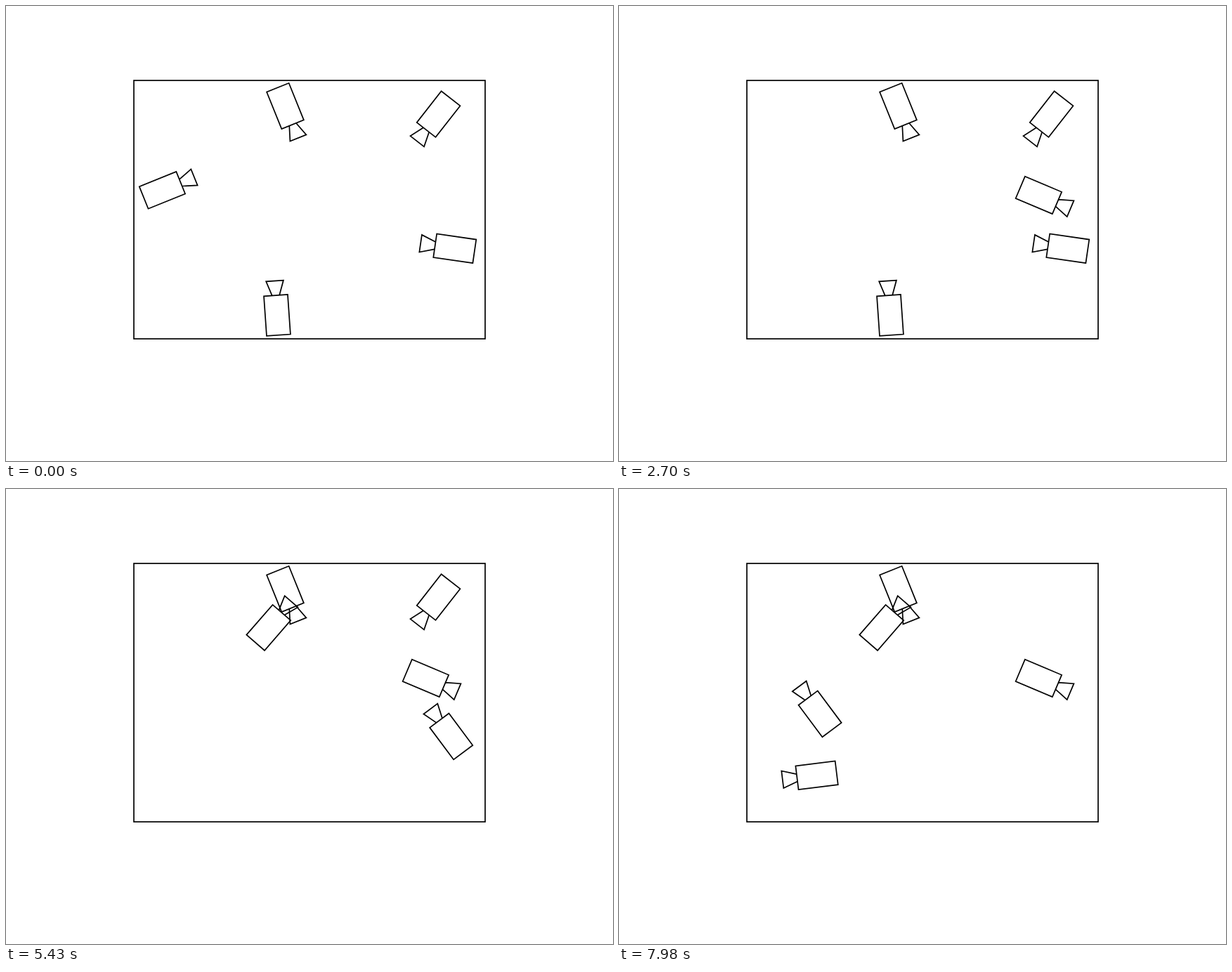
Animation, 864 px wide and 648 px high, one loop 8 s. Source, as an HTML page:

```html
<!DOCTYPE html>
<html lang="en">
<head>
<meta charset="utf-8">
<title>Turning cameras</title>
<style>
html, body { margin: 0; width: 100%; height: 100%; overflow: hidden; background: #fff; }
svg { display: block; width: 100vw; height: 100vh; }
</style>
</head>
<body>
<svg id="stage" viewBox="0 0 864 648" fill="none" stroke="#000" stroke-width="1.7" stroke-miterlimit="10">
  <rect x="182" y="106" width="500" height="368"/>
</svg>
<script>
const LOOP = 8000, STEP = 30, PHASE = 900, TURN = 45;

// Body and lens hood, facing right, around the point the camera turns on
const SHAPE = 'M-39.35-17h56.7v34h-56.7zM17.35-5.2L38.15-12.4V12.4L17.35 5.2';

// Each camera turns, then slides by (dx, dy), one after the other
const cameras = [
  { x: 232.6, y: 258.2, angle: -22, dx: 374.9, dy: 15.5 },
  { x: 385.2, y: 429.5, angle: 266, dx: -4.2, dy: -240.4 },
  { x: 627.9, y: 343.7, angle: 188.3, dx: -348.4, dy: -32.2 },
  { x: 608.8, y: 162.7, angle: 128, dx: -350.6, dy: 255.5 },
  { x: 401.6, y: 152.6, angle: 68 }
];

const stage = document.getElementById('stage');
for (const cam of cameras) {
  cam.node = document.createElementNS(stage.namespaceURI, 'path');
  cam.node.setAttribute('d', SHAPE);
  stage.append(cam.node);
}

// Cubic Bezier (.42, 0, .58, 1), solved for its parameter by bisection
function ease(p) {
  if (p <= 0) return 0;
  if (p >= 1) return 1;
  let lo = 0, hi = 1;
  for (let i = 0; i < 24; i++) {
    const s = (lo + hi) / 2, r = 1 - s;
    const x = 1.26 * s * r * r + 1.74 * s * s * r + s * s * s;
    if (x < p) lo = s; else hi = s;
  }
  return lo * lo * (3 - 2 * lo);
}

function draw(time) {
  const t = Math.floor(time % LOOP / STEP) * STEP;
  const progress = n => ease(t / PHASE - n);
  cameras.forEach((cam, i) => {
    const { x, y, angle, dx, dy, node } = cam;
    const turn = dx ? progress(2 * i + 1) : 0;
    const slide = dx ? progress(2 * i + 2) : 0;
    const px = x + slide * (dx || 0), py = y + slide * (dy || 0);
    node.setAttribute('transform', `translate(${px} ${py}) rotate(${angle + TURN * turn})`);
  });
}

const start = performance.now();
function tick() {
  draw(performance.now() - start);
  requestAnimationFrame(tick);
}
tick();
</script>
</body>
</html>
```
